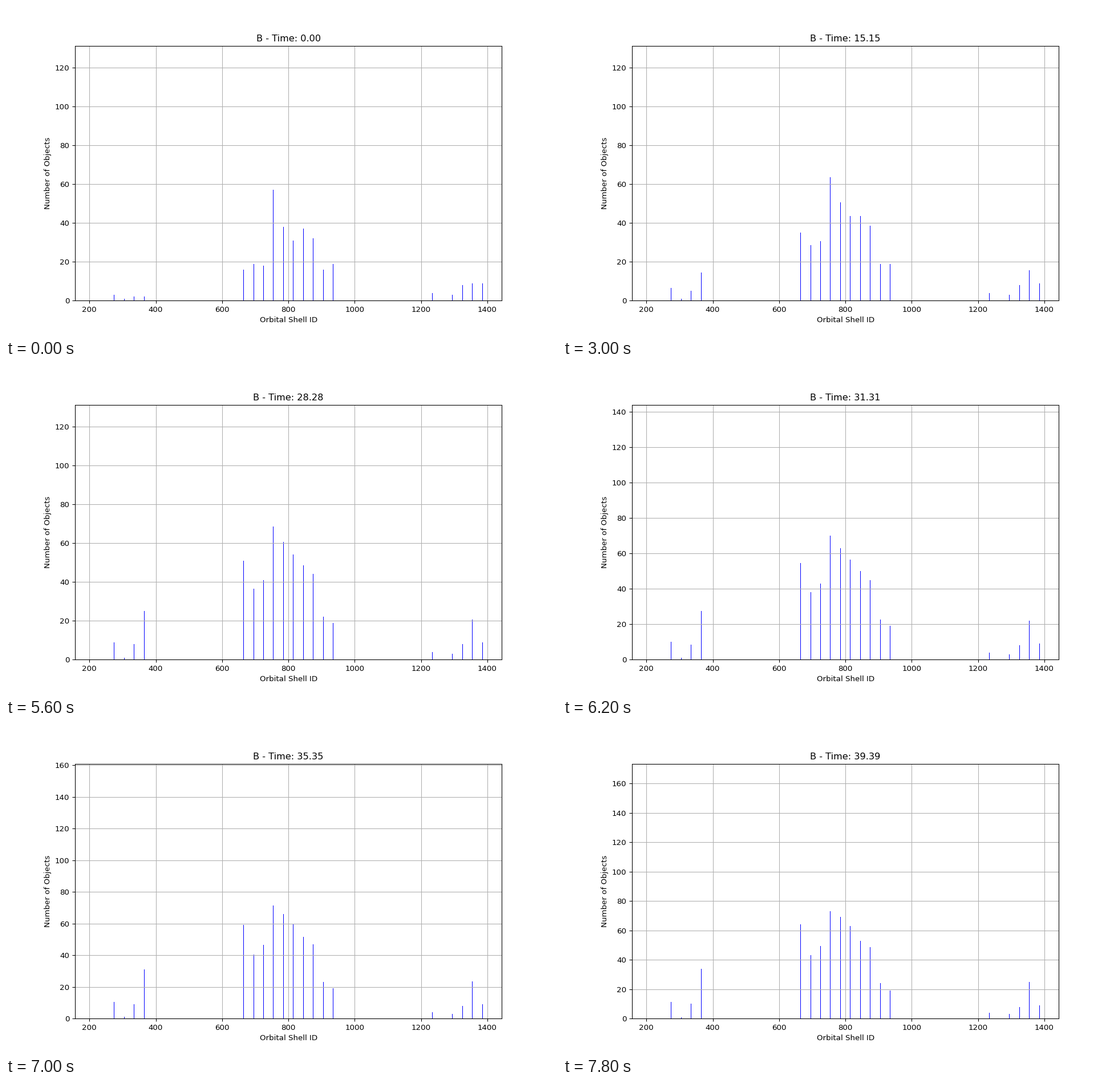
A matplotlib script that plays this animation: 966 by 580 pixels, repeating every 8 s.

```python
import numpy as np
import matplotlib.pyplot as plt
from matplotlib.animation import FuncAnimation

FRAMES = 40
INTERVAL = 200
STEP = 30  # distance between shells
SCALE = 0.966  # text and line size relative to matplotlib's defaults

# Runs of neighbouring shells: first id, starting counts, growth over the loop
RUNS = [
    (275, [3, 1, 2, 2], [8.5, 0, 8, 32]),
    (665, [16, 19, 18, 57, 38, 31, 37, 32, 16, 19],
          [48, 24, 31.5, 16, 31, 32, 16, 16.5, 8, 0]),
    (1235, [4, 0, 3, 8, 9, 9], [0, 0, 0, 0, 16, 0]),
]

shells = np.concatenate([first + STEP * np.arange(len(s)) for first, s, _ in RUNS])
start = np.concatenate([s for _, s, _ in RUNS])
growth = np.concatenate([g for _, _, g in RUNS])


def counts(step):
    """Nearly steady growth, counted in halves."""
    progress = (step / (FRAMES - 1)) ** 0.97
    return np.round(2 * (start + growth * progress)) / 2


def peak(step):
    """Largest value the y axis makes room for."""
    return np.interp(step, [28, 35, 39], [125, 153.2, 165.1])


for key in ("font.size", "axes.linewidth", "grid.linewidth", "axes.titlepad",
            "axes.labelpad", "xtick.major.size", "xtick.major.width",
            "xtick.major.pad", "ytick.major.size", "ytick.major.width",
            "ytick.major.pad"):
    plt.rcParams[key] *= SCALE

fig, ax = plt.subplots(figsize=(9.66, 5.8), dpi=100)

# The x axis spans shells 215 to 1385 plus the usual 5% margin
low, high = 214.6, 1385.4
margin = 0.05 * (high - low)
ax.set_xlim(low - margin, high + margin)
pixel = (high - low + 2 * margin) / ax.bbox.width

bars = ax.bar(shells, start, width=pixel, color="blue")
ax.set_xlabel("Orbital Shell ID")
ax.set_ylabel("Number of Objects")
ax.yaxis.set_major_locator(plt.MultipleLocator(20))
ax.grid(True)
title = ax.set_title("")


def update(step):
    for bar, height in zip(bars, counts(step)):
        bar.set_height(height)
    ax.set_ylim(0, 1.05 * peak(step))
    title.set_text(f"B - Time: {step * 100 / 99:.2f}")
    return [*bars, title]


anim = FuncAnimation(fig, update, frames=FRAMES, interval=INTERVAL, repeat=True)
plt.show()
```
